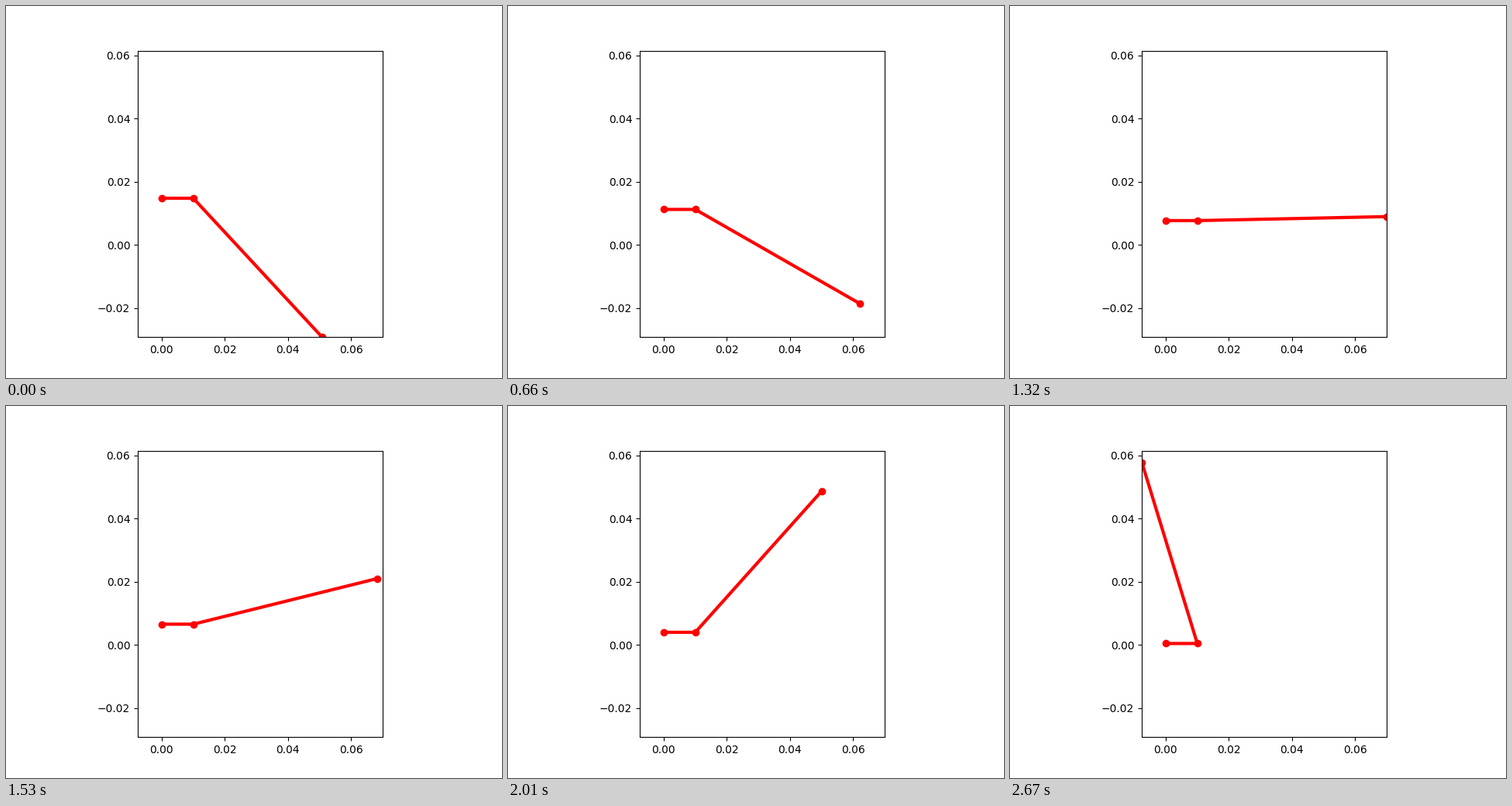
Write a matplotlib script that moves like this. It is 640 px wide and 480 px high and loops after 2.7 s.

```python
import numpy as np
import matplotlib.pyplot as plt
from matplotlib.animation import FuncAnimation

FRAMES = 90
INTERVAL = 30
BASE = 0.01      # length of the horizontal link
ARM = 0.06       # length of the swinging link
Y_START, Y_END = 0.01474, 0.0004

plt.rcParams["font.family"] = "DejaVu Sans"
fig, ax = plt.subplots(figsize=(6.4, 4.8), dpi=100)
ax.set_aspect("equal")
ax.set_xlim(-0.0076, 0.07)
ax.set_ylim(-0.02925, 0.0615)
ax.set_xticks([0, 0.02, 0.04, 0.06])
ax.set_yticks([-0.02, 0, 0.02, 0.04, 0.06])
linkage, = ax.plot([], [], "o-", color="red", lw=3)


def pose(k):
    """Joint positions: the base slides down while the arm speeds up."""
    y = Y_START + (Y_END - Y_START) * k / (FRAMES - 1)
    angle = np.radians(-47.15 + 0.48 * k + 0.01407 * k**2)
    xs = [0, BASE, BASE + ARM * np.cos(angle)]
    ys = [y, y, y + ARM * np.sin(angle)]
    return xs, ys


def update(k):
    linkage.set_data(*pose(k))
    return linkage,


anim = FuncAnimation(fig, update, frames=FRAMES, interval=INTERVAL,
                     repeat=True, repeat_delay=0, blit=False)
plt.show()
```
